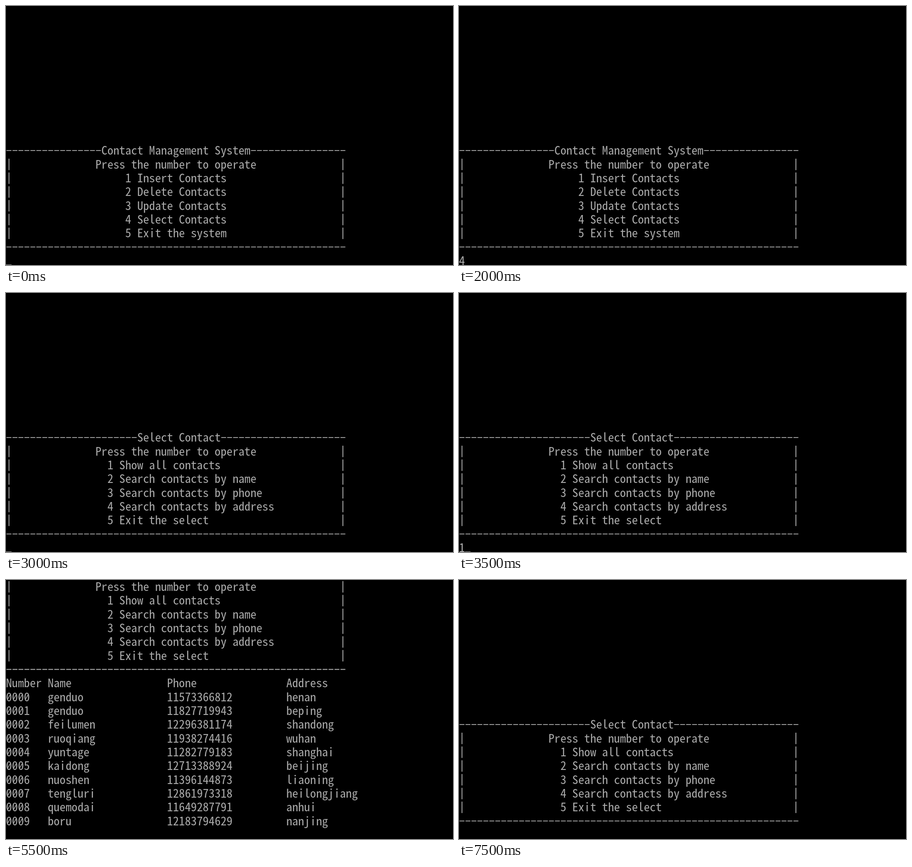
Recreate the animation shown at these times as an HTML page. Size 982x570 px, loop 8000 ms.

```html
<!DOCTYPE html>
<html lang="en">
<head>
<meta charset="utf-8">
<title>Contact Management System</title>
<style>
  html, body { margin: 0; width: 100%; height: 100%; overflow: hidden; background: #000; }
  svg { display: block; width: 982px; height: 570px; }
  text {
    font-family: "Noto Sans Mono CJK SC", "Noto Sans Mono CJK JP", "Noto Sans Mono", monospace;
    font-size: 26.2px;
    font-variant-ligatures: none;
    white-space: pre;
    fill: #aaa;
  }
  path { stroke: #aaa; fill: none; }
</style>
</head>
<body>
<svg id="stage" viewBox="0 0 982 570"></svg>
<script>
const CELL = 13.1, ROW = 30.33, COLS = 57, LAST_ROW = 18, LOOP = 8000;
const stage = document.getElementById('stage');
const baseline = row => 24 + row * ROW;

function add(parent, tag, attrs = {}) {
  const el = document.createElementNS('http://www.w3.org/2000/svg', tag);
  for (const key in attrs) el.setAttribute(key, attrs[key]);
  return parent.appendChild(el);
}

function write(parent, row, col, string) {
  const el = add(parent, 'text', { x: col * CELL, y: baseline(row) });
  el.textContent = string;
  return el;
}

function dashes(parent, row, from, to) {
  const y = baseline(row) - 9.2;
  add(parent, 'path', {
    d: `M${from * CELL + 1.2} ${y}H${to * CELL}`,
    'stroke-width': 1.9,
    'stroke-dasharray': `10.7 ${CELL - 10.7}`
  });
}

function bar(parent, row, col) {
  const x = (col + 0.5) * CELL, y = baseline(row);
  add(parent, 'path', { d: `M${x} ${y - 21.6}V${y + 3.6}`, 'stroke-width': 1.9 });
}

function slashZeros(parent, row, string) {
  [...string].forEach((char, i) => {
    if (char !== '0') return;
    const x = i * CELL, y = baseline(row);
    add(parent, 'path', { d: `M${x + 4} ${y - 5}L${x + 9.1} ${y - 14}`, 'stroke-width': 1.6 });
  });
}

function menu(parent, top, title, titleCol, items, itemCol) {
  dashes(parent, top, 0, titleCol);
  write(parent, top, titleCol, title);
  dashes(parent, top, titleCol + title.length, COLS);
  write(parent, top + 1, 15, 'Press the number to operate');
  items.forEach((item, i) => write(parent, top + 2 + i, itemCol, `${i + 1} ${item}`));
  for (let row = top + 1; row <= top + 6; row++) {
    bar(parent, row, 0);
    bar(parent, row, COLS - 1);
  }
  dashes(parent, top + 7, 0, COLS);
}

const selectMenu = (parent, top) => menu(parent, top, 'Select Contact', 22, [
  'Show all contacts', 'Search contacts by name', 'Search contacts by phone',
  'Search contacts by address', 'Exit the select'
], 17);

const contacts = [
  ['genduo', '11573366812', 'henan'],
  ['genduo', '11827719943', 'beping'],
  ['feilumen', '12296381174', 'shandong'],
  ['ruoqiang', '11938274416', 'wuhan'],
  ['yuntage', '11282779183', 'shanghai'],
  ['kaidong', '12713388924', 'beijing'],
  ['nuoshen', '11396144873', 'liaoning'],
  ['tengluri', '12861973318', 'heilongjiang'],
  ['quemodai', '11649287791', 'anhui'],
  ['boru', '12183794629', 'nanjing']
];

function table(parent, top) {
  const line = (row, cells) =>
    cells.forEach((cell, i) => write(parent, row, [0, 7, 27, 47][i], cell));
  line(top, ['Number', 'Name', 'Phone', 'Address']);
  contacts.forEach((contact, i) => {
    const id = String(i).padStart(4, '0');
    line(top + 1 + i, [id, ...contact]);
    slashZeros(parent, top + 1 + i, id);
  });
}

const screens = {};
for (const name of ['main', 'select', 'list']) screens[name] = add(stage, 'g');
menu(screens.main, 10, 'Contact Management System', 16, [
  'Insert Contacts', 'Delete Contacts', 'Update Contacts',
  'Select Contacts', 'Exit the system'
], 20);
selectMenu(screens.select, 10);
selectMenu(screens.list, -1);
table(screens.list, 7);

const input = write(stage, LAST_ROW, 0, '');
const cursor = add(stage, 'rect', { y: 569, width: 12.2, height: 1, fill: '#aaa' });

// Keep one glyph per cell whichever monospace face is present.
const probe = write(stage, -5, 0, 'n'.repeat(40));
const advance = probe.getComputedTextLength() / 40;
if (Math.abs(advance - CELL) > 0.02) {
  for (const el of stage.querySelectorAll('text')) {
    el.style.fontSize = 26.2 * CELL / advance + 'px';
  }
}
probe.remove();

// start time, screen, typed text, cursor shown
const steps = [
  [0, 'main', '', true],
  [1500, 'main', '', false],
  [2000, 'main', '4', false],
  [2500, 'select', '', false],
  [3000, 'select', '', true],
  [3500, 'select', '1', true],
  [4000, 'list', '', false],
  [4500, 'list', '', true],
  [5500, 'list', '', false],
  [6500, 'list', '2', false],
  [7500, 'select', '', false]
];

let shown;
function show(step) {
  if (step === shown) return;
  shown = step;
  const [, screen, typed, blink] = step;
  for (const name in screens) screens[name].style.display = name === screen ? '' : 'none';
  input.textContent = typed;
  cursor.setAttribute('x', typed.length * CELL);
  cursor.style.display = blink ? '' : 'none';
}

const start = performance.now();
function tick() {
  const time = (performance.now() - start) % LOOP;
  show(steps.filter(step => step[0] <= time).pop());
  requestAnimationFrame(tick);
}
tick();
</script>
</body>
</html>
```
